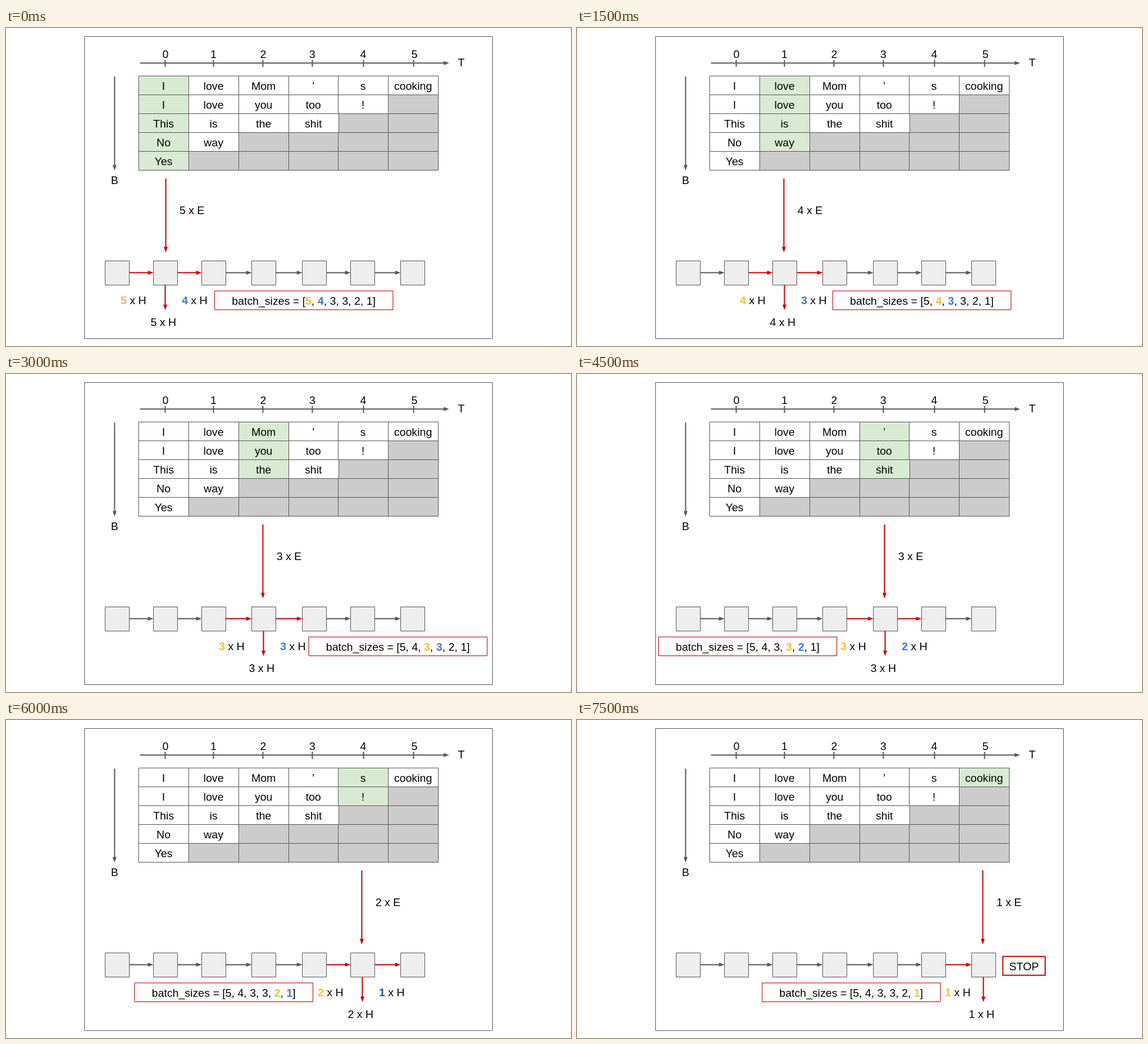
An HTML page that plays this animation: 960x540 px, repeating every 9000 ms.

```html
<!DOCTYPE html>
<html lang="en">
<head>
<meta charset="utf-8">
<title>Packed batches</title>
<style>
  html, body { margin: 0; width: 100%; height: 100%; overflow: hidden; background: #fff; }
  svg { display: block; width: 960px; height: 540px; }
  text { font: 18.667px "Liberation Sans", Arial, sans-serif; text-anchor: middle; fill: #000; }
  .bold { font-weight: bold; }
</style>
</head>
<body>
<svg id="stage" viewBox="0 0 960 540"></svg>
<script>
const STEP_MS = 1500;
const GREY = '#595959', RED = '#cc0000', GREEN = '#d9ead3', EMPTY = '#cccccc';
const YELLOW = '#f1c232', ORANGE = '#f6b26b', BLUE = '#3c78d8', DEEP_BLUE = '#1155cc';

const rows = [
  ['I', 'love', 'Mom', '’', 's', 'cooking'],
  ['I', 'love', 'you', 'too', '!'],
  ['This', 'is', 'the', 'shit'],
  ['No', 'way'],
  ['Yes']
];
const sizes = [5, 4, 3, 3, 2, 1];
const columnX = [225.5, 310.5, 395.5, 480.5, 564.5, 649.5, 734.5];
const tickX = [270.5, 352.5, 436.5, 520.5, 607.5, 692.5];
const tickLabelX = [271, 352.5, 437, 520.5, 607, 694];
const nodeX = [168.5, 250.5, 332.5, 417.5, 503.5, 585.5, 670.5];
const inputX = [271.5, 351.5, 436.5, 522.5, 604.5, 689.5];
const listX = [354.5, 434.5, 514.5, 138.5, 218.5, 314.5];
const NODE = 41;

const rect = (x, y, w, h, fill, stroke = GREY, width = 1) =>
  `<rect x="${x}" y="${y}" width="${w}" height="${h}" fill="${fill}" stroke="${stroke}" stroke-width="${width}" stroke-linejoin="round"/>`;

const line = (x1, y1, x2, y2, color) =>
  `<path d="M${x1} ${y1}L${x2} ${y2}" stroke="${color}" stroke-width="2"/>`;

const label = (x, y, content) => `<text x="${x}" y="${y}">${content}</text>`;

const bold = (content, color) => `<tspan class="bold" fill="${color}">${content}</tspan>`;

// Horizontal or vertical line with a stealth head whose point lands on (x2, y2).
function arrow(x1, y1, x2, y2, color) {
  const length = Math.hypot(x2 - x1, y2 - y1);
  const angle = Math.atan2(y2 - y1, x2 - x1) * 180 / Math.PI;
  const end = length - 6.855;
  return `<g transform="translate(${x1} ${y1}) rotate(${angle})" stroke="${color}" stroke-width="2">
    <path d="M0 0H${end}"/>
    <path d="M${end} 0l-2.249 2.249 6.179-2.249-6.179-2.249z" fill="${color}"/></g>`;
}

function table(active) {
  let out = '';
  for (let r = 0; r < rows.length; r++) {
    const edges = columnX.slice();
    if (r === 2) edges[4] += 1;
    for (let c = 0; c < 6; c++) {
      const word = rows[r][c];
      const fill = !word ? EMPTY : c === active ? GREEN : '#fff';
      const y = 81.5 + r * 32;
      out += rect(edges[c], y, edges[c + 1] - edges[c], 32, fill);
      if (word) out += label((columnX[c] + columnX[c + 1]) / 2 - .3, y + 23.5, word);
    }
  }
  return out;
}

function axes() {
  return arrow(227.5, 59.5, 753, 59.5, GREY) +
    tickX.map((x, i) => line(x, 54, x, 66, GREY) + label(tickLabelX[i], 50.5, i)).join('') +
    label(773.5, 65, 'T') +
    arrow(184.5, 82.5, 184.5, 242, GREY) +
    label(184.5, 265, 'B');
}

function chain(active) {
  return nodeX.map((x, i) => {
    const color = i === active || i === active + 1 ? RED : GREY;
    const next = nodeX[i + 1];
    return rect(x, 395.5, NODE, NODE, '#eeeeee') +
      (next ? arrow(x + NODE, 415.5, next, 415.5, color) : '');
  }).join('');
}

function sizeList(step) {
  const items = sizes.map((n, i) =>
    i === step ? bold(n, YELLOW) : i === step + 1 ? bold(n, BLUE) : n);
  return rect(listX[step], 446.5, 303, 32, '#fff', RED) +
    label(listX[step] + 151.4, 470, `batch_sizes = [${items.join(', ')}]`);
}

function flow(step) {
  const size = sizes[step], next = sizes[step + 1];
  const center = nodeX[step + 1] + NODE / 2;
  const x = inputX[step];
  const stateX = center - (next ? 54.5 : 44);
  let out = arrow(x, 255.5, x, 381, RED) +
    label(x + 44.5, 316, `${size} x E`) +
    arrow(center - .5, 436.5, center - .5, 479, RED) +
    label(center - 3.6, 506, `${size} x H`) +
    label(stateX, 469, `${bold(size, step ? YELLOW : ORANGE)} x H`);
  if (next) {
    out += label(center + 49.5, 469, `${bold(next, step === 4 ? DEEP_BLUE : BLUE)} x H`);
  } else {
    out += rect(723.5, 401.5, 72, 32, '#fff', RED, 2) + label(759.5, 424.5, 'STOP');
  }
  return out;
}

const stage = document.getElementById('stage');
stage.innerHTML = rect(133.5, 14.5, 693, 513, '#fff') + axes() +
  sizes.map((_, i) => `<g class="step">${table(i)}${chain(i)}${sizeList(i)}${flow(i)}</g>`).join('');
const steps = [...stage.querySelectorAll('.step')];

const start = performance.now();
function draw() {
  const now = Math.max(0, performance.now() - start);
  const current = Math.floor(now / STEP_MS) % steps.length;
  steps.forEach((group, i) => { group.style.display = i === current ? '' : 'none'; });
  requestAnimationFrame(draw);
}
draw();
</script>
</body>
</html>
```
